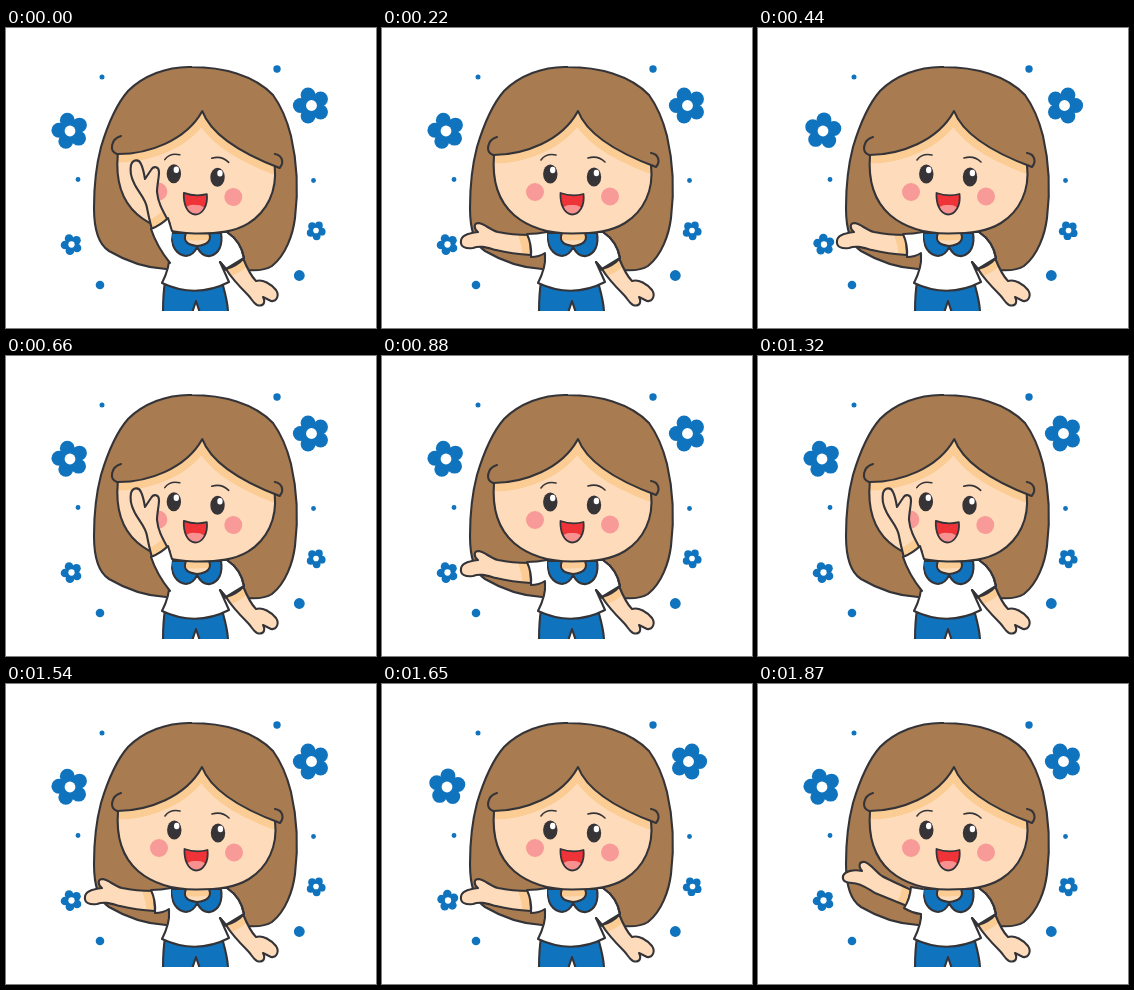
An HTML page with a canvas that plays this animation: 370 px wide and 300 px high, repeating every 1980 ms.

```html
<!DOCTYPE html>
<html lang="en">
<head>
<meta charset="utf-8">
<title>Waving girl</title>
<style>
html, body { margin: 0; width: 100%; height: 100%; overflow: hidden; background: #fff; }
canvas { display: block; width: 370px; height: 300px; }
</style>
</head>
<body>
<canvas id="stage" width="370" height="300"></canvas>
<script>
const ctx = document.getElementById('stage').getContext('2d');
const INK = '#343438', HAIR = '#a87b50', SKIN = '#fedbba', SHADE = '#fbcd95';
const BLUE = '#0f73be', CHEEK = '#f89a98';
const STEP = 110, CYCLE = 6;
const P = d => new Path2D(d);

const backHair = P('M186 39C161 38 137 48 122 63C109 78 101 99 95 119C90 138 88 160 88 180C88 201 92 216 103 223C120 233 140 240 160 241L240 242C252 243 260 242 266 238C280 227 287 206 289 190C293 158 291 134 285 108C281 92 275 78 267 67C248 47 216 39 186 39Z');
const fringe = P('M115 109C105 112 103 124 111 127C142 127 180 113 196 83C204 104 228 122 274 139C279 133 276 126 269 125');
const face = P('M112 127C142 127 180 113 196 83C204 104 228 122 269 137C272 162 262 183 243 195C230 203 214 205.5 190 205.5C166 205.5 146 199 132 187C116 173 110 152 112 127Z');
const jaw = P('M112 127C110 152 116 173 132 187C146 199 166 205.5 190 205.5C214 205.5 230 203 243 195C262 183 272 162 269 137');
const mouth = P('M178.5 165Q190 169 201.5 166C203 178 197 186.5 190 186.5C182 186 178 176 178.5 165Z');
const tongue = P('M176 184Q182 176 190 177Q198 176 204 184V190H176Z');
const brows = P('M159 132Q164 125 174 127M206 130Q216 127 223 134');

const shirt = P('M163 204V228C164 238 160 247 156 255Q190 271 223 254L214 234L220 241L238 230C236 219 230 210 221 204Z');
const rightSleeve = P('M214 234L220 241Q231 238 238 230C236 219 230 210 221 204');
const rightArm = P('M220 241L237 230C241 240 245 248 250 253C257 251 265 256 270 262C274 268 270 274 265 273L257 269C260 275 257 279 251 277C247 275 246 271 242 267C234 259 226 251 220 241Z');
const pants = P('M159 254C157 266 157 275 157 285H186L190 273L194 285H222C222 274 219 265 216 254Z');
const neck = P('M179 203H204C206 213 202 218 191 218C180 217 177 212 179 203Z');
const collar = P('M165 205C165 219 171 227 180 228Q188 227 191 219Q196 229 204 228C213 226 217 217 215 205H203C206 212 202 217 191 218C180 217 177 212 180 205Z');

// Waving arm poses: raised, halfway, lowered
const poses = [
  {
    arm: P('M148 208C145 199 143 190 141 180C140 171 132 164 128 155C125 149 124 142 125 137C127 131 133 131 135 136C137 140 138 145 139 151L145 142C148 137 153 139 153 144C153 150 151 157 151 164C152 175 157 183 164 196Z'),
    sleeve: P('M145 201Q155 197 162 190L166 204L165 212L168 228L164 235C156 225 149 213 145 201Z'),
    edge: P('M164 235C156 225 149 213 145 201Q155 197 162 190L166 203')
  },
  {
    arm: P('M153 206C143 201 133 197 124 192C118 188 114 181 107 178C101 177 100 182 104 187C96 185 87 187 85 192C84 197 88 199 94 199C103 199 110 205 117 209L149 222Z'),
    sleeve: P('M153 203Q152 215 146 224Q154 229 163 230L168 228L165 212L166 204Z'),
    edge: P('M165 205L153 203Q152 215 146 224Q154 229 163 230')
  },
  {
    arm: P('M148 207C136 207 125 206 116 204C108 202 103 196 97 195C91 195 92 201 96 204C87 205 79 207 79 213C78 219 84 221 91 220C99 217 106 220 114 222Q130 226 149 227Z'),
    sleeve: P('M145 206Q150 217 149 229Q157 229 163 225L168 228L165 212L165 204Z'),
    edge: P('M165 204Q155 206 145 206Q150 217 149 229Q157 229 163 225')
  }
];
const poseAt = [0, 1, 2, 2, 2, 1];
const swayAt = [0, 0, 0, 1, 1, 0];

function fill(path, color) {
  ctx.fillStyle = color;
  ctx.fill(path);
}
function line(path, width = 2.1, color = INK) {
  ctx.lineWidth = width;
  ctx.strokeStyle = color;
  ctx.stroke(path);
}
function shape(path, color) {
  fill(path, color);
  line(path);
}
function oval(x, y, rx, ry, color) {
  ctx.fillStyle = color;
  ctx.beginPath();
  ctx.ellipse(x, y, rx, ry, 0, 0, Math.PI * 2);
  ctx.fill();
}
function disc(x, y, r, color) {
  oval(x, y, r, r, color);
}
function inside(path, draw) {
  ctx.save();
  ctx.clip(path);
  draw();
  ctx.restore();
}
function flower(x, y, r, turn) {
  for (let i = 0; i < 5; i++) {
    const a = (turn + i * 72) * Math.PI / 180;
    disc(x + Math.cos(a) * r * 0.6, y + Math.sin(a) * r * 0.6, r * 0.4, BLUE);
  }
  disc(x, y, r * 0.55, BLUE);
  disc(x, y, r * 0.29, '#fff');
}
function eye(x, y) {
  oval(x, y, 7.2, 9.6, '#363437');
  oval(x + 2.4, y - 4, 2.7, 3.3, '#fff');
}

function decor(sway) {
  flower(64 + sway, 103, 18.6, -32 + sway * 19);
  flower(305.5 + sway, 77.5, 18.6, -36 + sway * 36);
  flower(65.5 + sway * 0.5, 216.5, 10.8, -40 + sway * 16);
  flower(310 + sway * 0.5, 202.5, 9.7, -60 + sway * 16);
  disc(96, 49, 2.5, BLUE);
  disc(271, 41, 3.7, BLUE);
  disc(72, 151.5, 2.4, BLUE);
  disc(307.5, 152.5, 2.4, BLUE);
  disc(94, 257, 4.3, BLUE);
  disc(293.3, 247.5, 5.4, BLUE);
}

function body() {
  inside(P('M0 0H370V283H0Z'), () => shape(pants, BLUE));
  fill(rightArm, SKIN);
  inside(rightArm, () => line(rightSleeve, 16, SHADE));
  line(rightArm);
  shape(shirt, '#fff');
  line(rightSleeve);
  fill(neck, SKIN);
  inside(neck, () => line(jaw, 14, SHADE));
  shape(collar, BLUE);
}

function head(tilt) {
  ctx.save();
  ctx.translate(190, 110);
  ctx.rotate(tilt);
  ctx.translate(-190, -110);
  fill(face, SKIN);
  inside(face, () => line(fringe, 17, SHADE));
  line(jaw);
  line(fringe);
  line(brows, 1.6);
  eye(168.3, 146);
  eye(212, 149);
  disc(153, 164, 9, CHEEK);
  disc(228, 168.5, 9, CHEEK);
  fill(mouth, '#ee3439');
  inside(mouth, () => fill(tongue, '#f8918f'));
  line(mouth, 1.8);
  ctx.restore();
}

function wave({ arm, sleeve, edge }) {
  fill(arm, SKIN);
  inside(arm, () => line(edge, 18, SHADE));
  line(arm);
  fill(sleeve, '#fff');
  line(edge);
}

function draw(now) {
  const step = Math.floor(now / STEP) % CYCLE;
  const pose = poseAt[step];
  ctx.fillStyle = '#fff';
  ctx.fillRect(0, 0, 370, 300);
  ctx.lineJoin = ctx.lineCap = 'round';
  decor(swayAt[step]);
  shape(backHair, HAIR);
  body();
  head(pose === 0 ? 0.012 : 0);
  wave(poses[pose]);
}

const start = performance.now();
function tick() {
  draw(performance.now() - start);
  requestAnimationFrame(tick);
}
tick();
</script>
</body>
</html>
```
